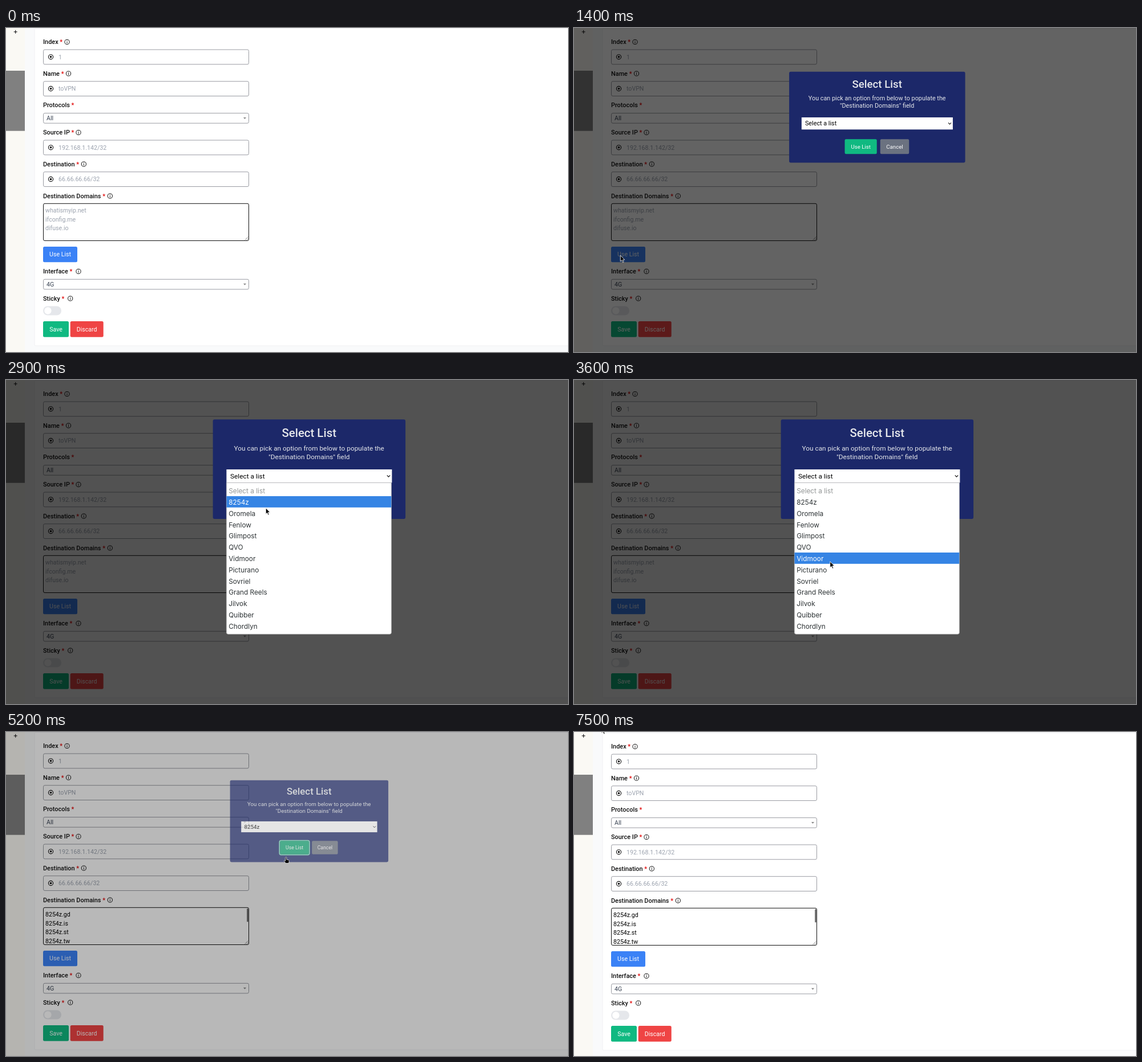
These frames come from a looping animation (985x569 px, 7700 ms). An HTML page:

```html
<!DOCTYPE html>
<html lang="en">
<head>
<meta charset="utf-8">
<title>Policy form</title>
<style>
  html, body { margin: 0; width: 100%; height: 100%; overflow: hidden; background: #f9fafb; }
  svg { display: block; width: 985px; height: 569px; font: 10.6px Roboto, sans-serif; }
  .label { font-size: 10.9px; font-weight: 500; }
  .hint { fill: #9ca3af; }
  .mid { text-anchor: middle; }
  .big { font-size: 11.84px; }
  .title { font-size: 20.4px; font-weight: 500; }
  .option { font: 11.8px Inter, sans-serif; }
</style>
</head>
<body>
<svg id="stage" viewBox="0 0 985 569"></svg>
<script>
const LOOP = 7700, STEP = 100;
const ROW_TOP = 185.1, ROW_H = 19.8, LINE_H = 15.75;
const OPTIONS = ['Select a list', '8254z', 'Oromela', 'Fenlow', 'Glimpost', 'QVO', 'Vidmoor',
  'Picturano', 'Sovriel', 'Grand Reels', 'Jilvok', 'Quibber', 'Chordlyn'];
const HINTS = ['whatismyip.net', 'ifconfig.me', 'difuse.io'];
const DOMAINS = ['8254z.gd', '8254z.is', '8254z.st', '8254z.tw', 'z8254z.cc', 'z8254z.gg', 'z8254z.is',
  'z8254z.eu', 'z8254z.se', 'z8254z.ws', '8254z.to'];

// Keyframes: [time, value, ...]
const POINTER = [[200, 507, 0], [900, 153, 391], [1200, 81, 399], [1400, 81, 399], [2100, 460, 165],
  [2500, 460, 165], [3300, 450, 284], [3900, 447, 353], [4100, 447, 290], [4300, 447, 217],
  [4600, 447, 217], [4800, 491, 220], [5200, 491, 220], [5700, 215, 359.5], [6900, 215, 359.5],
  [7400, 50, -5], [7500, 48, -9]];
const SCROLL = [[5800, 0], [6200, 115.5], [6600, 115.5], [7000, 0]];
const SCALE = [[1400, .914], [1500, 1.045], [1600, .955], [1700, 1], [5100, 1], [5200, .822]];
const SHADE = [[1300, 0], [1400, .61], [1500, .68], [5100, .68], [5200, .28], [5300, 0]];

function at(keys, t) {
  const next = keys.findIndex(k => k[0] > t);
  if (next < 1) return (next ? keys[keys.length - 1] : keys[0]).slice(1);
  const a = keys[next - 1], b = keys[next];
  const u = (t - a[0]) / (b[0] - a[0]), e = u * u * (3 - 2 * u);
  return a.slice(1).map((v, i) => v + (b[i + 1] - v) * e);
}

const rect = (x, y, w, h, fill, extra = '') =>
  `<rect x="${x}" y="${y}" width="${w}" height="${h}" fill="${fill}" ${extra}/>`;
const path = (d, extra) => `<path d="${d}" ${extra}/>`;
const text = (x, y, s, cls = '', fill = '') =>
  `<text x="${x}" y="${y}" class="${cls}" ${fill && `fill="${fill}"`}>${s}</text>`;
const button = (x, y, w, h, fill, s) =>
  rect(x, y, w, h, fill, 'rx="2.5"') + text(x + w / 2, y + h / 2 + 3.7, s, 'mid', '#fff');

function label(y, s, iconX) {
  const icon = iconX ? `<circle cx="${iconX}" cy="${y}" r="4.1" fill="none" stroke="#111"/>` +
    path(`M${iconX} ${y - .5}v2.8M${iconX} ${y - 2.4}v1.1`, 'stroke="#111"') : '';
  return text(65, y + 3.9, `${s} <tspan fill="#e00000">*</tspan>`, 'label', '#111') + icon;
}

const frame = (y, h, stroke = '#9a9ca3') =>
  rect(65.5, y, 360, h, '#fff', `rx="2.5" stroke="${stroke}"`);
const input = (y, s) => frame(y - 12.8, 25.8) +
  `<circle cx="78.5" cy="${y}" r="4.1" fill="none" stroke="#111" stroke-width="1.1"/>
   <circle cx="78.5" cy="${y}" r="1.8"/>` + text(92, y + 3.8, s, 'hint');
const dropdown = (y, s) => frame(y - 8.7, 17.6) + text(71, y + 4, s, '', '#374151') +
  path(`M416 ${y - 1.3}h5l-2.5 3z`, 'fill="#888"');

function textarea(t) {
  const filled = t >= 5200, [scroll] = at(SCROLL, t);
  const lines = (filled ? DOMAINS : HINTS)
    .map((s, i) => text(69, 323.9 + i * LINE_H - scroll, s, filled ? '' : 'hint')).join('');
  return frame(308.3, 65.2, '#111') + `<g clip-path="url(#area)">${lines}</g>` +
    path('M418.5 372.5l6-6M421.5 372.5l3-3', 'stroke="#777" stroke-width=".8"') +
    (filled ? rect(422.4, 310 + scroll * .265, 2, 23.5, '#444', 'rx="1"') : '');
}

function form(t) {
  const hover = t >= 1100 && t < 1400;
  return `<g transform="translate(0 ${t >= 5300 ? 1 : 0})">` +
    rect(50, .5, 945, 557.5, '#fff', 'rx="2" stroke="#f0f1f3"') +
    label(24.5, 'Index', 107) + input(50.8, '1') +
    label(80, 'Name', 109.5) + input(106.5, 'toVPN') +
    label(135.3, 'Protocols') + dropdown(158.3, 'All') +
    label(183.5, 'Source IP', 127) + input(209.8, '192.168.1.142/32') +
    label(239, 'Destination', 136.3) + input(265.5, '66.66.66.66/32') +
    label(295, 'Destination Domains', 182.3) + textarea(t) +
    button(65, 384, 60, 27.3, hover ? '#2563eb' : '#3b82f6', 'Use List') +
    label(427.4, 'Interface', 127) + dropdown(450, '4G') +
    label(475, 'Sticky', 112.7) +
    rect(65, 488.5, 32, 16, '#e5e7eb', 'rx="8"') + '<circle cx="73.4" cy="496.5" r="6.2" fill="#fff"/>' +
    button(65, 515, 45, 27.7, '#10b981', 'Save') + button(112.7, 515, 58, 27.7, '#ef4444', 'Discard') +
    '</g>';
}

function modal(t) {
  if (t < 1400 || t > 5200) return '';
  const [scale] = at(SCALE, t), closing = t === 5200;
  return `<g opacity="${closing ? .64 : 1}"
      transform="translate(531.4 156.5) scale(${scale}) translate(-531.4 -156.5)">` +
    rect(362.6, 69.2, 337.5, 174.8, '#1c2869', 'rx="3"') +
    text(531.2, 99.8, 'Select List', 'title mid', '#e5e7eb') +
    text(531.2, 124, 'You can pick an option from below to populate the', 'big mid', '#e5e7eb') +
    text(531.2, 138.5, '"Destination Domains" field', 'big mid', '#e5e7eb') +
    rect(386.4, 157, 290, 23.3, '#fff') +
    text(393, 172.9, OPTIONS[t >= 4500 ? 1 : 0], 'big', '#000') +
    path('M667.8 167.4l2.7 2.8 2.7-2.8', 'fill="none" stroke="#111" stroke-width="1.2"') +
    (closing ? rect(468, 198, 64, 30.5, 'none', 'rx="3.5" stroke="#7fe0be" stroke-width="2"') : '') +
    button(469.2, 198.8, 61.5, 28.5, t >= 4700 ? '#0ea774' : '#10b981', 'Use List') +
    button(537.2, 198.8, 55.3, 28.5, '#6b7280', 'Cancel') + '</g>';
}

function options(t, y) {
  if (t < 2300 || t >= 4500) return '';
  const active = Math.floor((y - ROW_TOP) / ROW_H);
  return path('M386.4 180.3h289v263q0 3-3 3h-283q-3 0-3-3z', 'fill="#fff" stroke="#b5b5b5" stroke-width=".8"') +
    OPTIONS.map((s, i) => {
      const top = ROW_TOP + i * ROW_H, on = i > 0 && i === active;
      return (on ? rect(386.5, top - .9, 288.8, ROW_H, '#3584e4') : '') +
        text(390.2, top + 14.1, s, 'option', on ? '#fff' : i ? '#2e3436' : '#929595');
    }).join('');
}

function pointer(t, [x, y]) {
  if (t < 200) return '';
  const hand = t >= 1100 && t < 1400 || t >= 4700 && t <= 5200;
  const beam = t >= 5600 && t < 7100;
  const shape = beam
    ? path('M-2.5-5.5h2l.5.5.5-.5h2M0-5V5M-2.5 5.5h2L0 5l.5.5h2', 'fill="none" stroke="#111" stroke-width="1.1"')
    : hand
      ? path('M-1.2.2q1.2-1.4 2 0V4l3.4.8q1.3.4 1 2L4.5 10.5H-.7L-3.6 6.6q0-1.3 1.2-.9l1.2.8z',
        'stroke="#fff" stroke-width=".7"')
      : path('M.3.3v10.6l2.4-2.2 1.8 4 1.7-.8-1.8-3.8h3.4z', 'stroke="#fff" stroke-width=".8"');
  return `<g transform="translate(${x} ${y})">${shape}</g>`;
}

function scene(t) {
  const tip = at(POINTER, t);
  return '<clipPath id="area"><rect x="66" y="309" width="359" height="64"/></clipPath>' +
    rect(0, 0, 985, 569, '#f9fafb') + rect(0, 0, 33, 569, '#faf9f4') + rect(0, 75, 33, 105.7, '#808080') +
    path('M13.7 6.7h6M16.7 3.7v6', 'stroke="#111" stroke-width="1.1"') +
    form(t) + rect(0, 0, 985, 569, '#000', `opacity="${at(SHADE, t)[0]}"`) +
    modal(t) + options(t, tip[1]) + pointer(t, tip);
}

const stage = document.getElementById('stage');
let shown = -1;
function tick() {
  const t = Math.floor(performance.now() % LOOP / STEP) * STEP;
  if (t !== shown) stage.innerHTML = scene(shown = t);
  requestAnimationFrame(tick);
}
tick();
</script>
</body>
</html>
```
